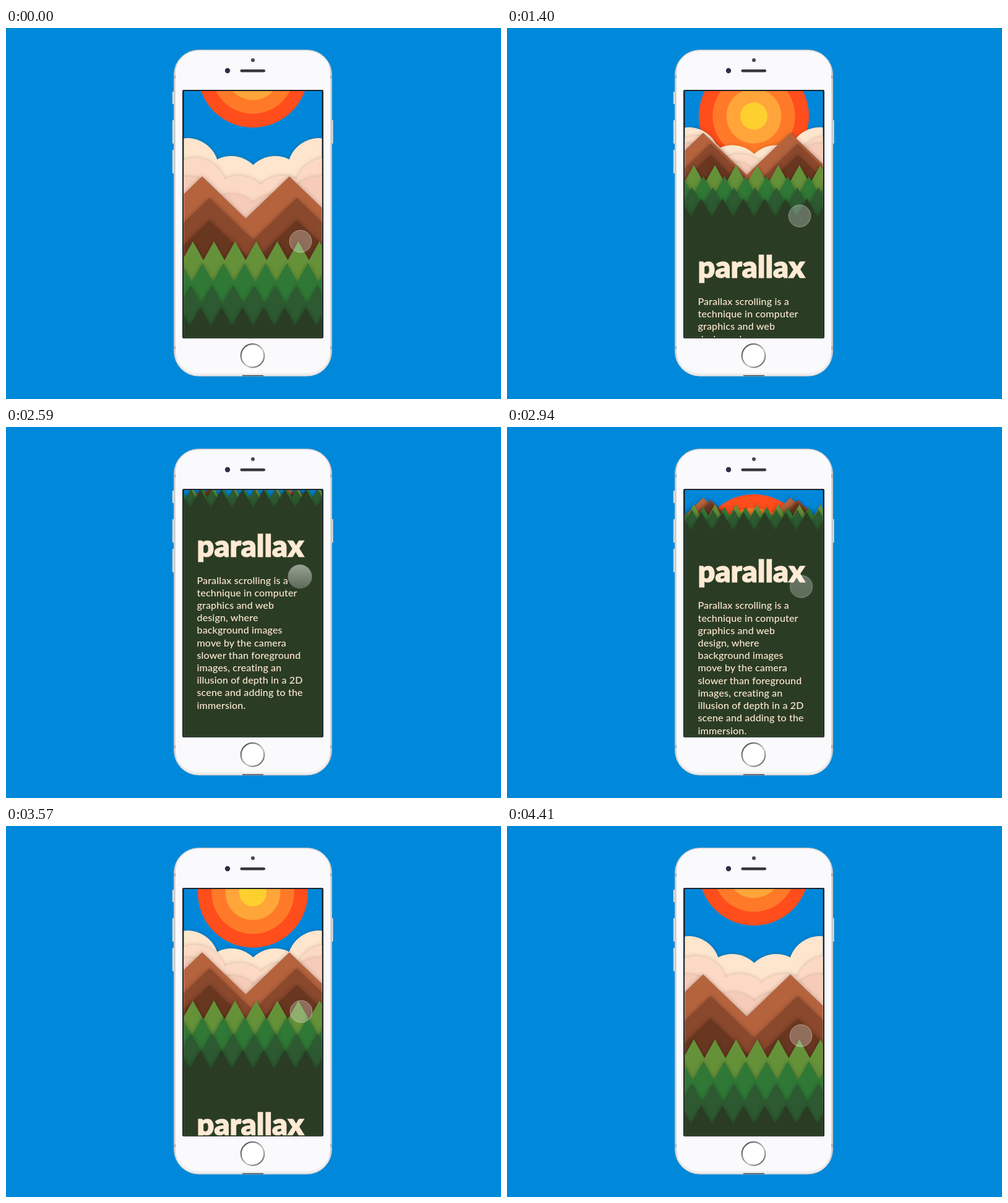
An HTML page that plays this animation: 800 px wide and 600 px high, repeating every 4.48 s.

```html
<!DOCTYPE html>
<html lang="en">
<head>
<meta charset="utf-8">
<title>Parallax</title>
<style>
  @property --s { syntax: "<number>"; inherits: true; initial-value: 0; }

  html, body { margin: 0; width: 100%; height: 100%; overflow: hidden; background: #0089db; }
  svg { display: block; width: 800px; height: 600px; animation: scroll 4480ms infinite; }

  .layer { transform: translateY(calc(var(--s) * var(--v) * -1px)); }
  .cloud { filter: drop-shadow(0 0 3px rgba(70, 30, 10, .25)); }
  .ridge { filter: drop-shadow(0 0 3.5px rgba(0, 0, 0, .28)); }

  text { font-family: Lato, "Open Sans", sans-serif; fill: #ffead4; }
  .title { font-size: 48.5px; font-weight: 900; stroke: #ffead4; stroke-width: 1.2px; }
  .body { font-size: 16px; font-weight: 500; letter-spacing: .15px; }

  .touch { animation: drag 4480ms linear infinite; }
  .idle, .press { animation: fade 4480ms linear infinite; }
  .idle { --rest: 1; --held: 0; }
  .press { --rest: 0; --held: 1; }

  @keyframes scroll {
    0%, 20.09% { --s: 0; animation-timing-function: cubic-bezier(.37, 0, .63, 1); }
    42.41%, 59.04% { --s: 390; animation-timing-function: cubic-bezier(.37, 0, .63, 1); }
    90.29%, 100% { --s: 0; }
  }
  @keyframes drag {
    0%, 18.75% { transform: translate(476px, 345px); }
    23.44% { transform: translate(476px, 340px); }
    31.25% { transform: translate(473px, 304px); }
    42.41% { transform: translate(474px, 265px); }
    55.8%, 59.04% { transform: translate(475px, 242px); }
    71.88% { transform: translate(476px, 273px); }
    79.69% { transform: translate(477px, 300px); }
    90.29% { transform: translate(476px, 320px); }
    98.44% { transform: translate(475px, 339px); }
    100% { transform: translate(476px, 345px); }
  }
  @keyframes fade {
    0%, 46% { opacity: var(--rest); }
    55.8%, 59.04% { opacity: var(--held); }
    66.96%, 100% { opacity: var(--rest); }
  }
</style>
</head>
<body>
<svg viewBox="0 0 800 600">
  <defs>
    <clipPath id="screen"><rect x="287.5" y="102" width="223" height="398.5"/></clipPath>
    <linearGradient id="edge" x2="1" y2="0">
      <stop offset="0" stop-color="#c9c9cb"/>
      <stop offset=".02" stop-color="#ececed"/>
      <stop offset=".98" stop-color="#ececed"/>
      <stop offset="1" stop-color="#c9c9cb"/>
    </linearGradient>
    <linearGradient id="ring" x2="1" y2="1">
      <stop offset="0" stop-color="#3c3c3c"/>
      <stop offset=".35" stop-color="#8c8c8c"/>
      <stop offset=".6" stop-color="#c8c8c8"/>
      <stop offset="1" stop-color="#444"/>
    </linearGradient>
    <linearGradient id="glass" x2="0" y2="1">
      <stop offset="0" stop-color="#fff" stop-opacity=".52"/>
      <stop offset="1" stop-color="#fff" stop-opacity=".24"/>
    </linearGradient>
  </defs>

  <g fill="#e4e4e5" stroke="#b3b5b8" stroke-width=".6">
    <rect x="269" y="103" width="4" height="20" rx="1"/>
    <rect x="269" y="149" width="4" height="38" rx="1"/>
    <rect x="269" y="197" width="4" height="38" rx="1"/>
    <rect x="525" y="149" width="3.5" height="38" rx="1"/>
  </g>
  <rect x="271.5" y="35.5" width="255" height="527.5" rx="40" fill="url(#edge)" stroke="#c2c3c5"/>
  <path d="M271.5 79h2.5m-2.5 438h2.5m250-438h2.5m-2.5 438h2.5" stroke="#a9abae" stroke-width="5"/>
  <rect x="274" y="37.5" width="250" height="521" rx="37" fill="#fafafc"/>
  <path d="M382 562.3h34" stroke="#4a4a4c" stroke-width="1.6"/>
  <circle cx="399" cy="52" r="3" fill="#47474d"/>
  <circle cx="358" cy="69" r="4.2" fill="#2f2f45"/>
  <rect x="378.5" y="67" width="40.5" height="4.6" rx="2.3" fill="#38383b"/>
  <circle cx="398.5" cy="530" r="18.8" fill="#fff" stroke="url(#ring)" stroke-width="2.2"/>
  <rect x="285" y="100" width="228" height="402" rx="2" fill="#20252a"/>

  <g clip-path="url(#screen)">
    <rect x="287" y="101" width="225" height="400" fill="#0087da"/>
    <g id="scene"></g>
    <g class="touch">
      <circle class="idle" r="17.8" fill="#fff" fill-opacity=".27" stroke="#fff" stroke-opacity=".42"/>
      <circle class="press" r="19.5" fill="url(#glass)"/>
    </g>
  </g>
</svg>
<script>
  const layer = (speed, content, kind = '') =>
    `<g class="layer ${kind}" style="--v:${speed}">${content}</g>`;

  const sun = () => ['#ff4d1c', '#ff7a28', '#ffa539', '#fdd02f']
    .map((fill, i) => `<circle cx="399" cy="72" r="${89 - i * 22.3}" fill="${fill}"/>`).join('');

  const cloud = (dx, top, fill) => {
    const puffs = [0, 29, 29, 0].map((dy, i) =>
      `<circle cx="${293 + dx + i * 71}" cy="${top + 51 + dy}" r="51"/>`);
    return `<g fill="${fill}">${puffs.join('')}<rect x="270" y="${top + 72}" width="260" height="300"/></g>`;
  };

  // Zigzag with a peak at (x, y), repeated every step, filled downwards.
  const ridge = (x, y, step, depth, fill) => {
    let d = '';
    for (let px = x - 2 * step; px < 580; px += step) {
      d += `${d ? 'L' : 'M'}${px} ${y}L${px + step / 2} ${y + depth}`;
    }
    return `<path d="${d}V920H200V${y + depth}Z" fill="${fill}"/>`;
  };

  const clouds = [[0, 178, '#fee5cd'], [12, 210, '#fcd9c4'], [0, 240, '#f6ccb9']];
  const mountains = [[317, 240, '#b5633d'], [329, 275, '#8a482c'], [329, 311, '#693720']];
  const trees = ['#659239', '#307836', '#2d5a30', '#2b3c24'];

  const lines = ['Parallax scrolling is a', 'technique in computer', 'graphics and web',
    'design, where', 'background images', 'move by the camera', 'slower than foreground',
    'images, creating an', 'illusion of depth in a 2D', 'scene and adding to the', 'immersion.'];
  const copy = '<text class="title" x="308.5" y="600">parallax</text>' + lines.map((line, i) =>
    `<text class="body" x="308.5" y="${643.5 + i * 20.22}">${line}</text>`).join('');

  document.getElementById('scene').innerHTML = [
    layer(-.36, sun()),
    ...clouds.map((c, i) => layer(.09 * (i + 1), cloud(...c), 'cloud')),
    ...mountains.map(([x, y, fill], i) => layer(.09 * (i + 4), ridge(x, y, 141, 68, fill), 'ridge')),
    ...trees.map((fill, i) =>
      layer(.09 * (i + 7), ridge(302 + 15.4 * i, 345 + 35.6 * i, 34.1, 30.5, fill), 'ridge')),
    layer(1, copy)
  ].join('');
</script>
</body>
</html>
```
